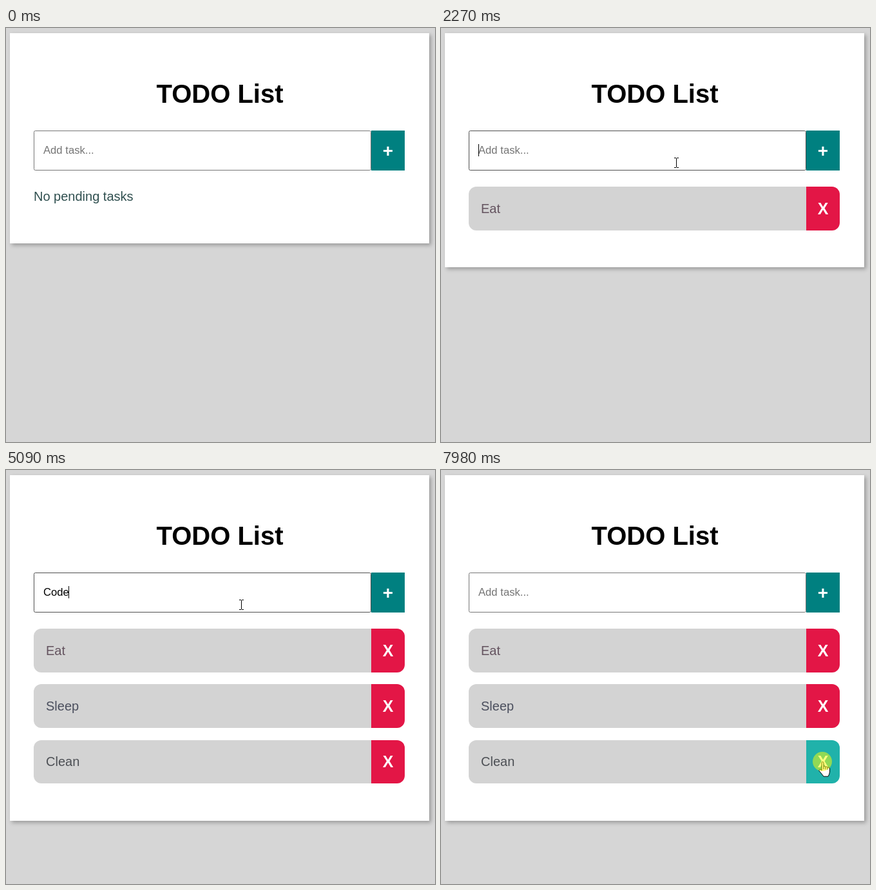
Recreate the animation shown at these times as an HTML page. Size 666 by 642 pixels, loop 8000 ms.

```html
<!DOCTYPE html>
<html lang="en">
<head>
<meta charset="utf-8">
<title>TODO List</title>
<style>
  html, body { margin: 0; width: 100%; height: 100%; overflow: hidden; background: #d6d6d6; }
  #card { position: absolute; left: 6px; top: 8px; width: 651px; background: #fff; box-shadow: 3px 3px 6px rgba(0, 0, 0, .28); }
  svg { position: absolute; left: 0; top: 0; font: 20px "Liberation Sans", Arial, sans-serif; }
  text { white-space: pre; }
  .title { font-size: 40px; font-weight: bold; text-anchor: middle; }
  .sign { font-size: 25px; font-weight: bold; text-anchor: middle; fill: #fff; }
  .plus { font-size: 28px; }
  #typed { font-size: 16.667px; }
  .cursor { fill: #fff; stroke: #000; stroke-linejoin: round; }
</style>
</head>
<body>
<div id="card"></div>
<svg width="666" height="642" viewBox="0 0 666 642">
  <text class="title" x="332" y="116">TODO List</text>
  <rect id="field" x="43.5" y="159.5" width="523" height="61" rx="2" fill="#fff"/>
  <text id="typed" x="58" y="195"></text>
  <rect id="caret" y="180" width="1" height="19"/>
  <rect x="567" y="159" width="52" height="62" fill="#008080"/>
  <text class="sign plus" x="593" y="200">+</text>
  <text id="empty" x="43" y="268" fill="#2f4f4f">No pending tasks</text>
  <g id="list"></g>
  <g id="pointer">
    <path id="arrow" class="cursor" d="M.5 .5V17L4.3 13.4 7 19.3 9.4 18.2 6.8 12.4H12Z"/>
    <path id="beam" class="cursor" style="fill:none" d="M-3 -7.5H0M1 -7.5H4M.5 -7V7M-3 7.5H0M1 7.5H4"/>
    <path id="hand" class="cursor" d="M-1 1.5Q.6 -.7 2 1.5V8Q3.5 6.5 5 8.4 6.5 7 8 9 10.5 8 11.5 11V16Q11 20 9 23.2H2Q-1 19 -5 14.5 -5 12 -3 12L-1 14ZM2 8V12M5 8.4V12.4M8 9V12.5"/>
    <circle id="press" r="15" fill="#ff0" fill-opacity=".5"/>
  </g>
</svg>
<script>
const LOOP = 8000;
const $ = id => document.getElementById(id);

// word, key times, time it is added, text colour
const tasks = [
  { word: 'Eat', keys: [1480, 1680, 1810], added: 2270, color: '#64535f' },
  { word: 'Sleep', keys: [2600, 2860, 2930, 3080, 3200], added: 3460, color: '#4b4f5e' },
  { word: 'Clean', keys: [3730, 3950, 4040, 4120, 4210], added: 4560, color: '#4c4f54' },
  { word: 'Code', keys: [4760, 4870, 4980, 5090], added: 5490, removed: 7400, color: '#4c4f54' }
];
const caretOn = [[880, 2340], [2600, 5620], [6150, 6650]];
const presses = [[880, 1020], [7250, 7400], [7980, LOOP]];
const moves = [
  { start: 130, end: 810, steps: 10, from: [574, 482], to: [365, 209] },
  { start: 6480, end: 7050, steps: 8, from: [366, 236], to: [592, 540] },
  { start: 7400, end: 7780, steps: 5, from: [592, 540], to: [592, 452] }
];

const within = (t, spans) => spans.some(([a, b]) => t >= a && t < b);
const show = (el, on) => el.setAttribute('visibility', on ? 'visible' : 'hidden');
const rowTop = i => Math.round(246 + 86.3 * i);
const rowEnd = i => Math.round(313.5 + 86.3 * i);

function make(box, tag, attrs, text = '') {
  const el = document.createElementNS('http://www.w3.org/2000/svg', tag);
  for (const key in attrs) el.setAttribute(key, attrs[key]);
  el.textContent = text;
  return box.appendChild(el);
}

tasks.forEach((task, i) => {
  const y = rowTop(i), b = rowEnd(i), row = task.row = make($('list'), 'g', {});
  const base = Math.round(286.7 + 86.3 * i);
  make(row, 'path', { fill: '#d3d3d3', d: `M567 ${y}H55a12 12 0 0 0 -12 12V${b - 12}a12 12 0 0 0 12 12H567Z` });
  task.button = make(row, 'path', { d: `M567 ${y}H607a12 12 0 0 1 12 12V${b - 12}a12 12 0 0 1 -12 12H567Z` });
  make(row, 'text', { x: 62, y: base, fill: task.color }, task.word);
  make(row, 'text', { x: 593, y: base + 2, class: 'sign' }, 'X');
});

function pointerAt(t) {
  const m = moves.filter(m => t >= m.start).pop();
  if (!m) return null;
  const p = Math.min(1, Math.floor((t - m.start) / (m.end - m.start) * m.steps + 1e-6) / m.steps);
  const e = p * p * (3 - 2 * p);
  return m.from.map((v, k) => Math.round(v + (m.to[k] - v) * e));
}

function render(t) {
  const typing = tasks.find(k => t >= k.keys[0] && t < k.added);
  const text = typing ? typing.word.slice(0, typing.keys.filter(k => t >= k).length) : '';
  const typed = $('typed');
  typed.textContent = text || 'Add task...';
  typed.setAttribute('fill', text ? '#000' : '#757575');
  const width = text ? typed.getComputedTextLength() : 0;
  $('caret').setAttribute('x', Math.max(58, Math.floor(57.9 + width)));
  show($('caret'), within(t, caretOn));

  const pos = pointerAt(t);
  const [x, y] = pos || [-99, -99];
  const pressed = within(t, presses);
  const overField = x >= 43 && x < 567 && y >= 159 && y < 221;
  $('field').setAttribute('stroke', !overField ? '#767676' : pressed ? '#858585' : '#4f4f4f');

  let count = 0, overButton = false;
  tasks.forEach((task, i) => {
    const on = t >= task.added && !(t >= task.removed);
    const hover = on && x >= 567 && x < 619 && y >= rowTop(i) && y < rowEnd(i);
    show(task.row, on);
    task.button.setAttribute('fill', hover ? '#20b2aa' : '#e31646');
    count += on;
    overButton = overButton || hover;
  });
  show($('empty'), !count);
  $('card').style.height = (count ? Math.round(284.7 + 86.3 * count) : 334) - 8 + 'px';

  $('pointer').setAttribute('transform', `translate(${x} ${y})`);
  show($('arrow'), pos && !overField && !overButton);
  show($('beam'), overField);
  show($('hand'), overButton);
  show($('press'), pressed);
}

function tick() {
  render(performance.now() % LOOP);
  requestAnimationFrame(tick);
}
tick();
</script>
</body>
</html>
```
